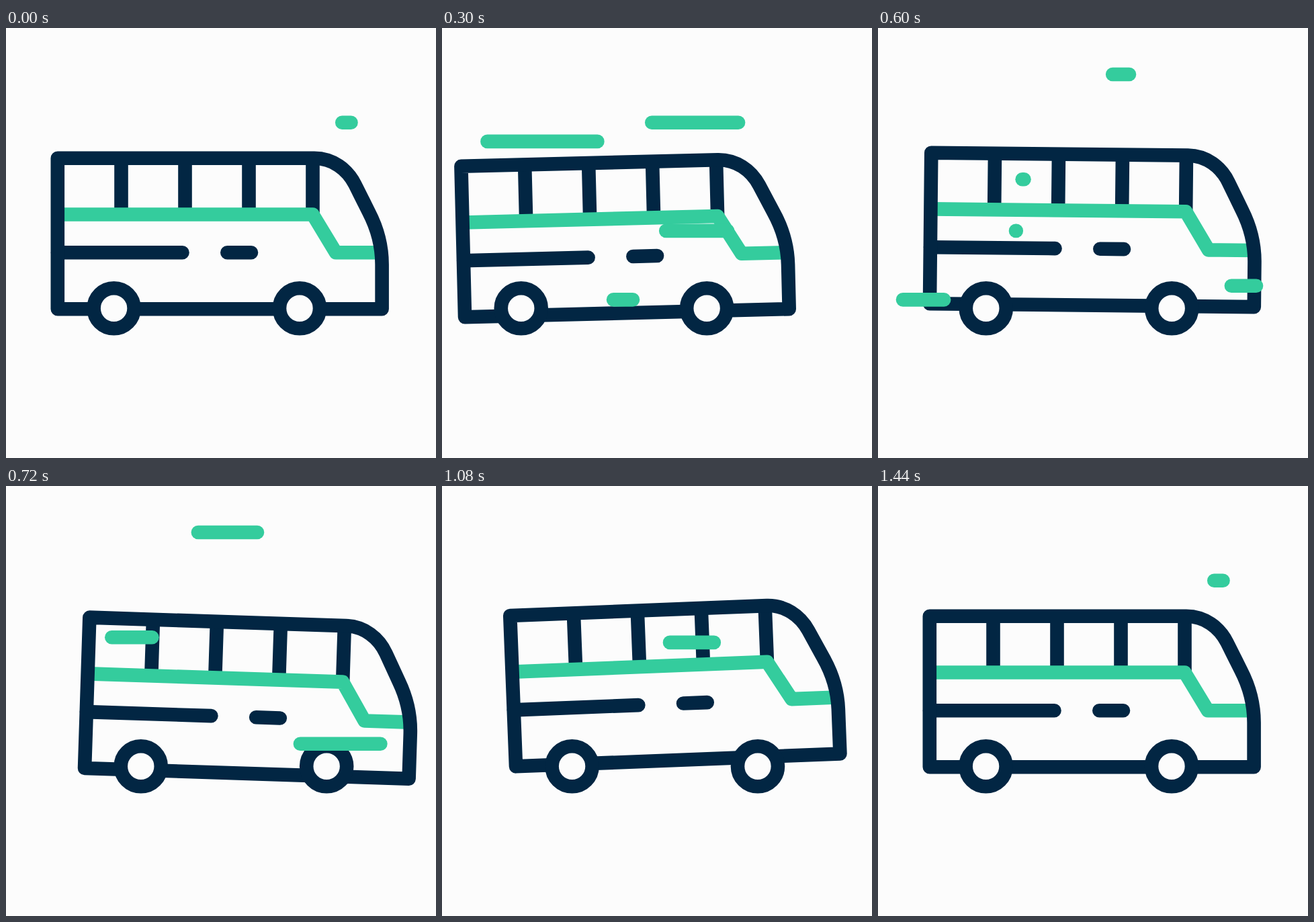
Write an HTML page that moves like this. It is 640 by 640 pixels and loops after 1.65 s.

```html
<!DOCTYPE html>
<html lang="en">
<head>
<meta charset="utf-8">
<title>Bus ride</title>
<style>
  html, body { margin: 0; width: 100%; height: 100%; overflow: hidden; background: #fcfcfc; }
  svg { display: block; width: 100vw; height: 100vh; }
  .ink { stroke: #022643; }
  .mint { stroke: #34cc9d; }
  g { fill: none; stroke-width: 20.6; stroke-linecap: round; stroke-linejoin: round; }
  .post { stroke-linecap: butt; }
  circle { fill: #fcfcfc; }
</style>
</head>
<body>
<svg viewBox="0 0 640 640">
  <g id="bus">
    <g id="body">
      <path class="ink post" d="M171.5 194v83m95 0v-83m95 0v83m95 0v-83"/>
      <path class="mint" d="M78 277.5H456.5L490.8 334.2H558"/>
      <path class="ink" d="M77 334.3H262.5M329.3 334.3H365"/>
      <path class="ink" d="M76.8 193.8H459C486 194 508 210 519.5 233L540 274C553 299 559.6 324 559.6 352V418.3H76.8Z"/>
    </g>
    <circle class="ink" cx="160.6" cy="417.3" r="30"/>
    <circle class="ink" cx="437" cy="417.3" r="30"/>
  </g>
  <g id="wind" class="mint"></g>
</svg>
<script>
const LOOP = 1650, STEP = 30, START = 60, END = 1440;
const FADE = 285; // time a streak's tail needs to catch up with its head
const [bus, body, wind] = ['bus', 'body', 'wind'].map(id => document.getElementById(id));

// [time, value] keys, eased in and out between neighbours
const shift = [[60, 0], [375, -50], [864, 64], [1305, 0]];
const tilt = [[60, 0], [375, -1.67], [765, 2], [1000, -2.45], [1440, 0]];
const bounce = [[60, 0], [270, 7], [495, -16], [738, 10], [978, -14], [1285, 0]];

const streaks = [
  streak(140.7, 513.5, 285, 5, 376),
  streak(168.9, 293, 46.5, 62, 290),
  streak(301.9, 425, 205, 100, 450),
  streak(404.4, 284, 37, 220, 375),
  streak(69, 374, 175, 490, 498),
  streak(225.2, 217.5, 17, 571, 410),
  streak(383.8, 563, 356, 492, 400),
  streak(232.9, 593, 339, 725, 330)
];

function ease(t, from, span) {
  const u = Math.min(1, Math.max(0, (t - from) / span));
  return u * u * (3 - 2 * u);
}

function track(keys, t) {
  return keys.slice(1).reduce((sum, [time, value], i) => {
    const [t0, v0] = keys[i];
    return sum + (value - v0) * ease(t, t0, time - t0);
  }, keys[0][1]);
}

// The head runs from right to left; the tail sets off when the head is halfway.
function streak(y, right, left, begin, grow) {
  const el = document.createElementNS('http://www.w3.org/2000/svg', 'path');
  wind.appendChild(el);
  const cycle = END - START, release = begin + grow / 2;
  const at = (t, from, span) => right + (left - right) * ease(t, from, span);
  return time => {
    const t = time - cycle > begin ? time - cycle : time;
    const head = at(t, begin, grow), tail = at(t, release, FADE);
    el.setAttribute('d', tail - head > 0.1 ? `M${head} ${y}H${tail}` : '');
  };
}

function draw(ms) {
  const stepped = Math.floor((ms % LOOP) / STEP) * STEP;
  const t = Math.min(END, Math.max(START, stepped));
  bus.setAttribute('transform', `translate(${track(shift, t)} 0)`);
  body.setAttribute('transform',
    `translate(0 ${track(bounce, t)}) rotate(${track(tilt, t)} 318.2 417)`);
  streaks.forEach(update => update(t));
}

const begin = performance.now();
function tick() {
  draw(performance.now() - begin);
  requestAnimationFrame(tick);
}
tick();
</script>
</body>
</html>
```
